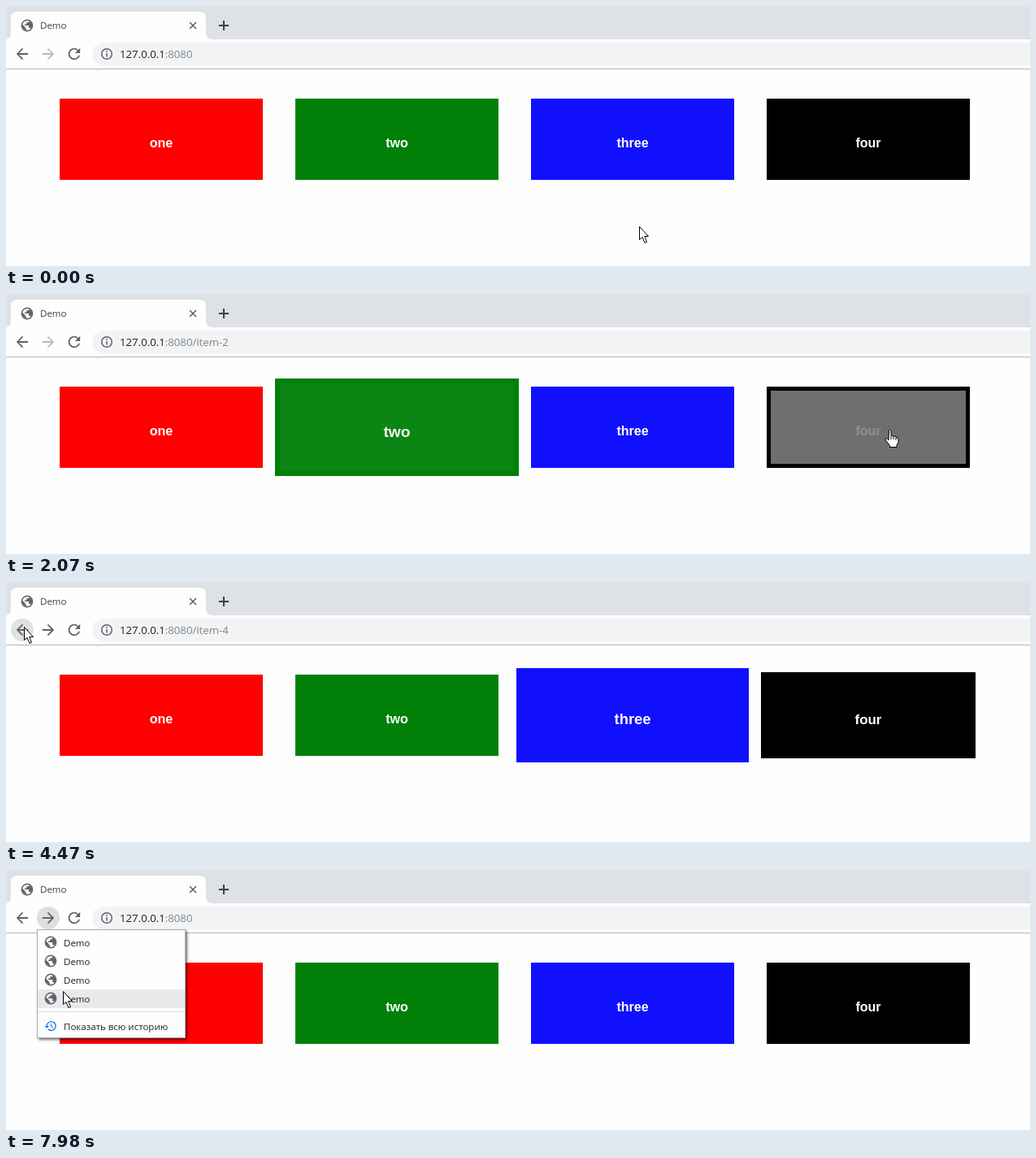
Recreate the animation shown at these times as an HTML page with a canvas. Size 1260 by 320 pixels, loop 8 s.

```html
<!DOCTYPE html>
<html lang="en">
<head>
<meta charset="utf-8">
<title>Demo</title>
<style>
html, body { margin: 0; width: 100%; height: 100%; overflow: hidden; background: #fefefe; }
canvas { display: block; }
</style>
</head>
<body>
<canvas id="stage" width="1260" height="320"></canvas>
<script>
const ctx = document.getElementById('stage').getContext('2d');
const LOOP = 8000, FADE = 300, MENU_OPEN = 7180, FIRST_BACK = 4413;
const UI_FONT = '"Open Sans", "Noto Sans", sans-serif';
const GREY = '#5f6368', INK = '#202124', WHITE = '#fefefe';
const PAGE = [254, 254, 254], BLACK = [0, 0, 0];

const boxes = [
  { label: 'one', color: [255, 0, 0] },
  { label: 'two', color: [0, 128, 9] },
  { label: 'three', color: [16, 16, 255] },
  { label: 'four', color: BLACK },
].map((box, i) => ({ ...box, id: i + 1, cx: 191 + 290 * i, cy: 164 }));

// Events: [time, id that becomes current], 0 for none
const visits = [[880, 1], [1710, 2], [2390, 4], [3190, 3], [FIRST_BACK, 4], [4770, 2], [5100, 1], [5610, 0]];
const BACK = 1, FORWARD = 2;
const presses = [[4270, BACK], [5620, 0], [6700, FORWARD]];

// Pointer moves: start, end, x, y
const home = [779, 271];
const moves = [
  [20, 600, 240, 200],
  [1078, 1335, 586, 179],
  [1790, 1880, 640, 95],
  [1880, 1975, 940, 110],
  [1975, 2070, 1087, 167],
  [2500, 2850, 849, 158],
  [3350, 3980, 28, 58],
  [4020, 4070, 22, 55],
  [6200, 6790, 44, 43],
  [7590, 7960, 70, 149],
];

const icons = {
  arrow: new Path2D('M20 11H7.83l5.59-5.59L12 4l-8 8 8 8 1.41-1.41L7.83 13H20z'),
  reload: new Path2D('M17.65 6.35A7.96 7.96 0 0 0 12 4c-4.42 0-8 3.58-8 8s3.58 8 8 8c3.73 0 6.84-2.55 7.73-6h-2.08A6 6 0 0 1 12 18c-3.31 0-6-2.69-6-6s2.69-6 6-6c1.66 0 3.14.69 4.22 1.78L13 11h7V4z'),
  globe: new Path2D('M12 2a10 10 0 1 0 0 20 10 10 0 0 0 0-20zM12 4a8 8 0 1 0 0 16 8 8 0 0 0 0-16zM11 20C7 19 4 16 4 12l.2-1.8L9 15v1l2 2zM18 17.4L16 16h-1v-4H8v-2h3V7h4V4.6C18 6 20 9 20 12c0 2-.8 4-2 5.4z'),
  history: new Path2D('M13 3a9 9 0 0 0-9 9H1l4 4 4-4H6c0-3.87 3.13-7 7-7s7 3.13 7 7-3.13 7-7 7c-1.93 0-3.68-.79-4.94-2.06l-1.42 1.42A9 9 0 1 0 13 3zm-1 5v5l4.28 2.54.72-1.21-3.5-2.08V8z'),
};
const arrowPointer = new Path2D('M.5 .5V16.5L4 13.5 7 20.5 9.5 19.5 6.7 12.5H11.5z');
const handPointer = new Path2D('M-.5 1L.5 .5 2 1.5V7.5H4.5L5 8.5H7.5L8 9.5 10 10 11 11.5V15.5L9 19V21.5H.5V19.5L-4.5 13-5 11.5-3 10.5-1 13zM2 8v4M5 9v3M8 10v3');

const clamp = x => Math.min(1, Math.max(0, x));
const smooth = x => x * x * (3 - 2 * x);
const mix = (a, b, p) => `rgb(${a.map((v, i) => Math.round(v + (b[i] - v) * p))})`;

// The CSS "ease" curve, cubic-bezier(.25, .1, .25, 1)
function ease(x) {
  if (x <= 0) return 0;
  if (x >= 1) return 1;
  let lo = 0, hi = 1, u;
  for (let i = 0; i < 16; i++) {
    u = (lo + hi) / 2;
    const at = .75 * u * (1 - u) + u ** 3;
    if (at < x) lo = u; else hi = u;
  }
  return .3 * u * (1 - u) ** 2 + 3 * u * u * (1 - u) + u ** 3;
}

const current = (t, events) => events.reduce((id, [at, next]) => t >= at ? next : id, 0);

// How far the transition of one id has got, 0 to 1
function share(t, events, id) {
  let was = 0, total = 0;
  for (const [at, next] of events) {
    total += ((next === id) - (was === id)) * ease((t - at) / FADE);
    was = next;
  }
  return total;
}

function pointerAt(t) {
  let [x, y] = home;
  for (const [start, end, toX, toY] of moves) {
    const p = smooth(clamp((t - start) / (end - start)));
    x += (toX - x) * p;
    y += (toY - y) * p;
  }
  return [Math.round(x), Math.round(y)];
}

const scaleOf = (t, box) => 1 + .2 * share(t, visits, box.id);

function boxUnder(t) {
  const [x, y] = pointerAt(t);
  const hit = boxes.find(box => {
    const s = scaleOf(t, box);
    return Math.abs(x - box.cx) < 125 * s && Math.abs(y - box.cy) < 50 * s;
  });
  return hit ? hit.id : 0;
}

// Follow the pointer once to learn when it enters and leaves the boxes
const hovers = [];
for (let t = 0, last = 0; t < MENU_OPEN; t += 2) {
  const id = boxUnder(t);
  if (id !== last) hovers.push([t, last = id]);
}

function rect(x, y, w, h, color) {
  ctx.fillStyle = color;
  ctx.fillRect(x, y, w, h);
}

function text(str, x, y, color, size = 11.5) {
  ctx.font = `${size}px ${UI_FONT}`;
  ctx.textAlign = 'left';
  ctx.fillStyle = color;
  ctx.fillText(str, x, y);
  return x + ctx.measureText(str).width;
}

function icon(name, x, y, scale, color = GREY, flip = 1) {
  ctx.save();
  ctx.translate(x, y);
  ctx.scale(scale * flip, scale);
  ctx.translate(-12, -12);
  ctx.fillStyle = color;
  ctx.fill(icons[name], 'evenodd');
  ctx.restore();
}

function stroke(d, color, width) {
  ctx.strokeStyle = color;
  ctx.lineWidth = width;
  ctx.stroke(new Path2D(d));
}

function pill(x, y, w, h, color) {
  ctx.fillStyle = color;
  ctx.beginPath();
  ctx.roundRect(x, y, w, h, h / 2);
  ctx.fill();
}

function navButton(t, id, x, color, flip) {
  pill(x - 14, 45, 28, 28, `rgba(60,64,67,${.16 * share(t, presses, id)})`);
  icon('arrow', x, 59, .9, color, flip);
}

function drawBrowser(t) {
  rect(0, 0, 1260, 41, '#dee1e6');
  rect(0, 41, 1260, 36, WHITE);
  rect(0, 77, 1260, 1, '#b0b7bb');
  ctx.fillStyle = WHITE;
  ctx.fill(new Path2D('M0 41Q6 40 6 33V15Q6 7 14 7H238Q246 7 246 15V33Q246 41 254 41z'));
  icon('globe', 26, 24, .74);
  text('Demo', 42, 28, '#3c4043');
  stroke('M226 20l8 8m0-8l-8 8', GREY, 1.6);
  stroke('M262 24h12M268 18v12', '#3c4043', 2);

  navButton(t, BACK, 20, GREY, 1);
  navButton(t, FORWARD, 52, t < FIRST_BACK ? '#babcbe' : GREY, -1);
  icon('reload', 84, 59, .9);

  pill(106, 45, 1200, 28, '#f1f3f4');
  stroke('M130.3 59a6.3 6.3 0 1 0-12.6 0a6.3 6.3 0 1 0 12.6 0M124 58v4.5M124 55v1.7', GREY, 1.5);
  const item = current(t, visits);
  const end = text('127.0.0.1', 140, 64, INK, 13.2);
  text(':8080' + (item ? '/item-' + item : ''), end, 64, '#80868b', 13.2);
}

function drawBox(t, box) {
  const scale = scaleOf(t, box), lit = share(t, hovers, box.id);
  // Edges snap outwards to whole pixels
  const w = 2 * Math.ceil(125 * scale - .01), h = 2 * Math.ceil(50 * scale - .01);
  const border = Math.round(5 * scale);
  ctx.save();
  ctx.translate(box.cx, box.cy);
  rect(-w / 2, -h / 2, w, h, mix(box.color, PAGE, 0));
  if (lit > 0) rect(border - w / 2, border - h / 2, w - 2 * border, h - 2 * border, mix(box.color, PAGE, lit));
  ctx.scale(scale, scale);
  ctx.font = 'bold 16px "Liberation Sans", Arial, sans-serif';
  ctx.textAlign = 'center';
  ctx.fillStyle = mix(PAGE, BLACK, lit);
  ctx.fillText(box.label, 0, 10);
  ctx.restore();
}

function drawMenu(pointerY) {
  ctx.save();
  ctx.shadowColor = 'rgba(0,0,0,.55)';
  ctx.shadowBlur = 3;
  ctx.shadowOffsetX = ctx.shadowOffsetY = 2;
  rect(38, 73, 183, 134, '#a9abad');
  ctx.restore();
  rect(39, 74, 181, 132, WHITE);
  const selected = Math.floor((pointerY - 78) / 23);
  for (let row = 0; row < 4; row++) {
    const top = 78 + 23 * row;
    if (row === selected) rect(39, top, 181, 23, '#e8e9eb');
    icon('globe', 55, top + 11, .74);
    text('Demo', 71, top + 16, INK);
  }
  rect(39, 174, 181, 1, '#dadce0');
  icon('history', 55, 192, .68, '#1a73e8');
  text('Показать всю историю', 71, 197, INK);
}

function drawPointer(x, y, shape) {
  ctx.save();
  ctx.translate(x, y);
  ctx.fillStyle = '#fff';
  ctx.fill(shape);
  ctx.strokeStyle = '#000';
  ctx.lineWidth = 1;
  ctx.stroke(shape);
  ctx.restore();
}

function draw(now) {
  const t = now % LOOP;
  const [x, y] = pointerAt(t);
  rect(0, 0, 1260, 320, WHITE);
  drawBrowser(t);
  boxes.forEach(box => drawBox(t, box));
  if (t >= MENU_OPEN) drawMenu(y);
  drawPointer(x, y, current(t, hovers) ? handPointer : arrowPointer);
}

const start = performance.now();
function tick() {
  draw(performance.now() - start);
  requestAnimationFrame(tick);
}
tick();
</script>
</body>
</html>
```
